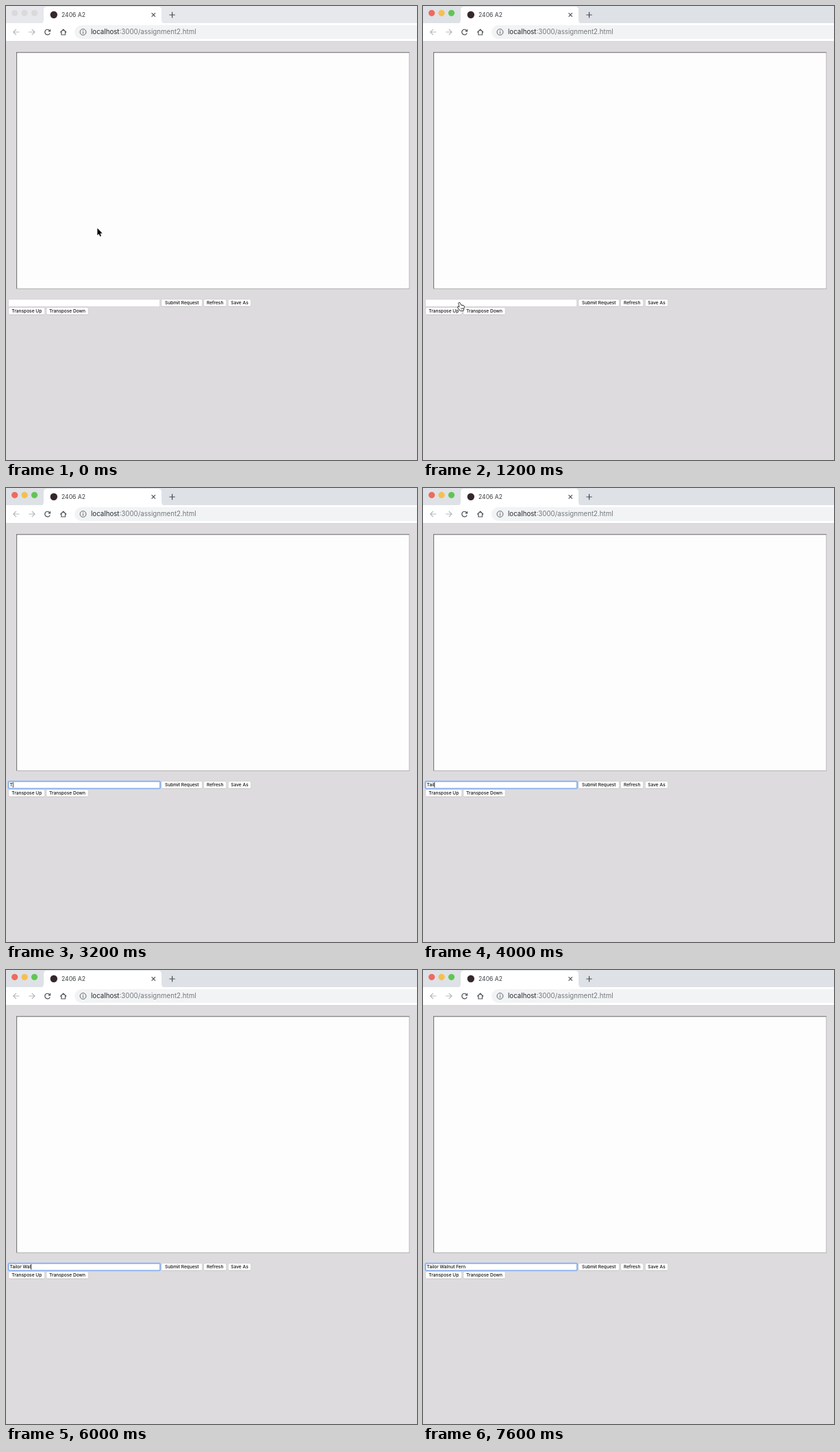
Recreate the animation shown at these times as an HTML page with a canvas. Size 600x662 px, loop 8000 ms.

```html
<!DOCTYPE html>
<html lang="en">
<head>
<meta charset="utf-8">
<title>2406 A2</title>
<style>
  html, body { margin: 0; width: 100%; height: 100%; overflow: hidden; background: #dddbdd; }
  canvas { display: block; width: 600px; height: 662px; }
</style>
</head>
<body>
<canvas id="stage"></canvas>
<script>
const WIDTH = 600, HEIGHT = 662, LOOP = 8000, STEP = 200;
const ACTIVE_AT = 800, FOCUS_AT = 2000, HIDE_POINTER_AT = 3200;
const TAB_FONT = '8.6px Inter, sans-serif';
const URL_FONT = '9.72px Inter, sans-serif';
const FORM_FONT = '500 6.6px Inter, sans-serif';
const QUERY = 'Tailor Walnut Fern';

// [time, typed letters, caret visible]
const TYPING = [
  [2000, 0, 1], [2600, 0, 0], [3000, 0, 1], [3200, 1, 1], [3600, 1, 0],
  [3800, 2, 1], [4000, 4, 1], [4200, 6, 1], [4800, 6, 0], [5000, 6, 1],
  [5200, 7, 1], [5600, 7, 0], [5800, 8, 1], [6000, 10, 1], [6200, 11, 1],
  [6400, 12, 1], [6600, 13, 1], [6800, 14, 1], [7000, 15, 1],
  [7200, 18, 1], [7600, 18, 0]
];

// [time, x, y, shape]
const POINTER = [
  [0, 133.4, 324, 'arrow'], [200, 122, 344, 'arrow'], [400, 96, 388, 'arrow'],
  [600, 66, 428, 'arrow'], [800, 53, 440, 'hand'], [1000, 52, 438, 'hand'],
  [1200, 51.5, 432.3, 'hand'], [1600, 53.5, 431, 'beam']
];

const canvas = document.getElementById('stage');
const ctx = canvas.getContext('2d');
const ratio = window.devicePixelRatio || 1;
canvas.width = WIDTH * ratio;
canvas.height = HEIGHT * ratio;

const latest = (list, time) => list.filter(entry => entry[0] <= time).pop();

function rect(x, y, w, h, color) {
  ctx.fillStyle = color;
  ctx.fillRect(x, y, w, h);
}

function box(x, y, w, h, radius, fill) {
  ctx.beginPath();
  ctx.roundRect(x, y, w, h, radius);
  paint(fill);
}

function circle(x, y, r, fill, stroke, lineWidth) {
  ctx.beginPath();
  ctx.arc(x, y, r, 0, Math.PI * 2);
  paint(fill, stroke, lineWidth);
}

function shape(d, fill, stroke, lineWidth, x = 0, y = 0) {
  ctx.save();
  ctx.translate(x, y);
  paint(fill, stroke, lineWidth, new Path2D(d));
  ctx.restore();
}

function paint(fill, stroke, lineWidth, path) {
  if (stroke) {
    ctx.strokeStyle = stroke;
    ctx.lineWidth = lineWidth;
    path ? ctx.stroke(path) : ctx.stroke();
  }
  if (fill) {
    ctx.fillStyle = fill;
    path ? ctx.fill(path) : ctx.fill();
  }
}

function text(value, x, y, font, color, align = 'left') {
  ctx.font = font;
  ctx.fillStyle = color;
  ctx.textAlign = align;
  ctx.fillText(value, x, y);
  return ctx.measureText(value).width;
}

function drawTabs(active) {
  rect(0, 0, WIDTH, 26, active ? '#dee1e6' : '#e7e8ec');
  const lights = active ? ['#ed6a5e', '#f5bf4f', '#61c554'] : Array(3).fill('#dadadc');
  lights.forEach((color, i) => circle(12.7 + i * 14.4, 10.3, 4.6, color));

  shape('M50 25.5Q55 25.5 55 20V6Q55 1 60 1H222Q227 1 227 6V20Q227 25.5 232 25.5Z', '#fff');
  circle(69.8, 12.8, 5.2, '#35282b');
  text('2406 A2', 81, 16.1, TAB_FONT, '#3c4043');
  shape('M212.6 10.2l5.4 5.4M218 10.2l-5.4 5.4', null, '#494c50', 1.1);
  shape('M238.4 13H246.8M242.6 8.8V17.2', null, '#494c50', 1.2);
}

function drawToolbar() {
  rect(0, 25, WIDTH, 26, '#fff');
  rect(0, 51, WIDTH, 0.7, '#d0d0d2');
  shape('M19.4 38H10.8M14.9 33.8L10.7 38L14.9 42.2', null, '#b5b7ba', 1.2);
  shape('M33.3 38H41.9M37.8 33.8L42 38L37.8 42.2', null, '#b5b7ba', 1.2);
  ctx.beginPath();
  ctx.arc(60.6, 38.1, 3.8, 0.35, Math.PI * 1.76);
  paint(null, '#53565a', 1.3);
  shape('M65.2 33.4V37.4H61.2Z', '#53565a');
  shape('M79.3 38.5L83.7 34.2L88.1 38.5M80.9 37.5V42H86.5V37.5', null, '#53565a', 1.2);

  box(100, 28, 530, 20, 10, '#f1f3f4');
  circle(112.5, 38, 4.4, null, '#5f6368', 1);
  rect(112, 37.4, 1, 3, '#5f6368');
  rect(112, 35.4, 1, 1.1, '#5f6368');
  const hostWidth = text('localhost', 124, 41.4, URL_FONT, '#25282c');
  text(':3000/assignment2.html', 124 + hostWidth, 41.4, URL_FONT, '#74777b');
}

function drawButton(label, x, y, w) {
  box(x - 0.2, y - 0.2, w + 0.4, 10.6, 1.8, '#bebcbe');
  box(x + 0.2, y, w - 0.4, 9.7, 1.5, '#fff');
  text(label, x + w / 2, y + 7.1, FORM_FONT, '#111', 'center');
}

function drawInput(time) {
  if (time < FOCUS_AT) {
    rect(3.6, 427.8, 221, 10.5, '#d0ced0');
    rect(4, 428.2, 220.2, 9.7, '#fff');
    return;
  }
  box(2.2, 426.4, 224.2, 13, 3, '#b4cdf1');
  box(2.9, 427.1, 222.8, 11.6, 2, '#82adeb');
  rect(4.5, 428.6, 219.6, 8.8, '#fff');
  const [, count, caret] = latest(TYPING, time);
  const width = text(QUERY.slice(0, count), 5.4, 435.1, FORM_FONT, '#111');
  if (caret) rect(5.5 + width, 429, 0.9, 7.8, '#222');
}

function drawPage(time) {
  rect(0, 51.5, WIDTH, HEIGHT - 51.5, '#dddbdd');
  rect(15.2, 67.4, 574, 345.2, '#a5a4a6');
  rect(15.2, 67.4, 573.6, 1, '#6c6c6f');
  rect(15.2, 67.4, 1, 344.6, '#6c6c6f');
  rect(16.2, 68.4, 572.3, 343.4, '#fefdfe');
  drawInput(time);
  drawButton('Submit Request', 227, 428, 59.5);
  drawButton('Refresh', 288.8, 428, 32.8);
  drawButton('Save As', 324.4, 428, 33.2);
  drawButton('Transpose Up', 4, 440, 52.6);
  drawButton('Transpose Down', 59, 440, 61);
}

function drawPointer(time) {
  if (time >= HIDE_POINTER_AT) return;
  const [, x, y, kind] = latest(POINTER, time);
  if (kind === 'arrow') {
    shape('M0 0V10.3L2.3 8.2L3.9 11.9L5.5 11.2L4 7.6H7.2Z', '#000', '#fff', 1.4, x, y);
  } else if (kind === 'hand') {
    const d = 'M0.6 1.2Q1.2-.4 2.4 1L3.9 4.4Q5.1 3.6 5.7 4.5Q6.6 4 7.2 5Q8.4 4.8 8.5 6.2L8 9.2L7.2 11.8H2.8L.1 8.3Q-1.4 6.4 .2 6.2L2 7.2Z';
    shape(d, '#fff', '#111', 1.5, x, y);
    shape('M4.2 8V10.2M5.6 7.8V10.2M7 7.8V10', null, '#111', 0.6, x, y);
  } else {
    const d = 'M-2.4-5.3Q0-5.3 0-3.8Q0-5.3 2.4-5.3M0-4V4.2M-2.4 5.5Q0 5.5 0 4Q0 5.5 2.4 5.5M-1.3 1.8H1.3';
    shape(d, null, '#fff', 2, x, y);
    shape(d, null, '#111', 1, x, y);
  }
}

function render(now) {
  const time = Math.floor((now % LOOP) / STEP) * STEP;
  ctx.setTransform(ratio, 0, 0, ratio, 0, 0);
  drawTabs(time >= ACTIVE_AT);
  drawToolbar();
  drawPage(time);
  drawPointer(time);
}

const start = performance.now();
function tick() {
  render(performance.now() - start);
  requestAnimationFrame(tick);
}
tick();
</script>
</body>
</html>
```
